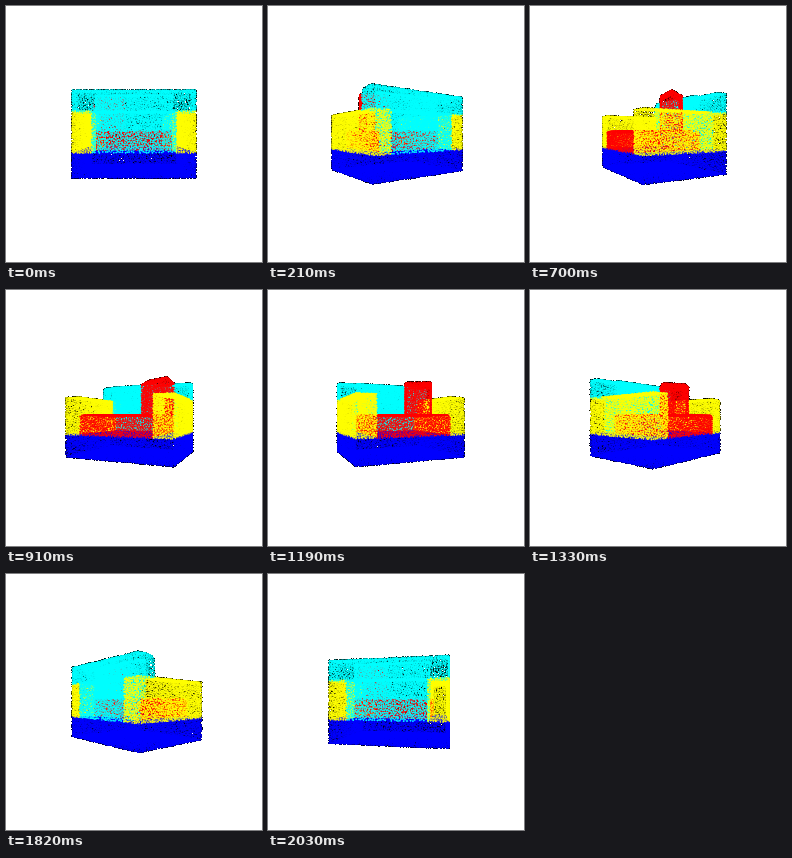
Recreate the animation shown at these times as a matplotlib script. Size 256 px wide and 256 px high, loop 2100 ms.

```python
import numpy as np
import matplotlib.pyplot as plt
from matplotlib.animation import FuncAnimation

SIZE = 256
FRAMES, INTERVAL = 30, 70
FOCAL = SIZE / 2 / np.tan(np.radians(30))   # 60 degree field of view
CAMERA = 6.19
RADIUS = 1.28                               # point radius in pixels
DENSITY = 320                               # points per unit of surface
SURPLUS = 4                                 # candidates per kept point

BLUE, YELLOW = (0, 0, 1), (1, 1, 0)
RED, CYAN = (1, 0, 0), (0, 1, 1)

W, D = 1.41, 1.15                           # half width, half depth
INNER = 0.96                                # inner side of the arms
BASE, SEAT, ARM = -0.43, 0.07, 0.52         # heights of the tops
BACK = 0.68                                 # front of the backrest

rng = np.random.default_rng(7)


def spread(pts):
    """Keep an evenly spaced subset by farthest point sampling."""
    x, y, z = pts.T.copy()
    gap = np.full(len(pts), np.inf)
    keep = np.zeros(len(pts) // SURPLUS, int)
    for i in range(1, len(keep)):
        j = keep[i - 1]
        np.minimum(gap, (x - x[j]) ** 2 + (y - y[j]) ** 2 + (z - z[j]) ** 2,
                   out=gap)
        keep[i] = gap.argmax()
    return pts[keep]


def box(lo, hi, faces="xXyYzZ"):
    """Even points on the chosen faces; capitals mean the upper side."""
    lo, hi = np.array(lo, float), np.array(hi, float)
    size = hi - lo
    parts = []
    for face in faces:
        axis = "xyz".index(face.lower())
        area = np.prod(np.delete(size, axis))
        pts = lo + size * rng.random((int(area * DENSITY * SURPLUS), 3))
        pts[:, axis] = hi[axis] if face.isupper() else lo[axis]
        parts.append(pts)
    return spread(np.vstack(parts))


def round_front(pts, r=0.2):
    """Round the upper front edge of the backrest."""
    dz, dy = BACK + r - pts[:, 2], pts[:, 1] - (1 - r)
    dist = np.hypot(dz, dy)
    out = (dz > 0) & (dy > 0) & (dist > r)
    pts[out, 2] = BACK + r - dz[out] * r / dist[out]
    pts[out, 1] = 1 - r + dy[out] * r / dist[out]
    return pts


def pillow():
    """Turned cushion with a ridge along its top."""
    a, y, b = box((-0.36, SEAT, -0.25), (0.36, 1.04, 0.25)).T
    y = np.minimum(y, 1.04 - 0.15 * np.abs(b) / 0.25)
    c, s = np.cos(np.radians(30)), np.sin(np.radians(30))
    return np.column_stack([-0.69 + a * c - b * s, y, -0.03 + a * s + b * c])


PARTS = [
    (box((-W, -1, -D), (W, BASE, D)), BLUE),
    (box((-W, BASE, -D), (-INNER, ARM, D)), YELLOW),
    (box((INNER, BASE, -D), (W, ARM, D)), YELLOW),
    (box((-INNER, BASE, -D), (INNER, SEAT, BACK)), RED),
    (pillow(), RED),
    (round_front(box((-W, ARM, BACK), (W, 1, D))), CYAN),
    (box((-INNER, BASE, BACK), (INNER, ARM, D), "xXzZ"), CYAN),
    (box((-INNER, SEAT, 0.5), (INNER, 0.97, BACK)), CYAN),
]
POINTS = np.vstack([p for p, _ in PARTS])
COLORS = np.vstack([np.tile(c, (len(p), 1)) for p, c in PARTS]).astype(float)


def render(k):
    """Blend soft discs front to back over black; untouched pixels are white."""
    t = 2 * np.pi * k / FRAMES
    x, y, z = POINTS.T
    depth = CAMERA - (z * np.cos(t) - x * np.sin(t))
    scale = FOCAL / depth
    u = SIZE / 2 + (x * np.cos(t) + z * np.sin(t)) * scale
    v = SIZE / 2 - y * scale

    dy, dx = np.mgrid[-2:3, -2:3].reshape(2, -1, 1)
    col = np.floor(u).astype(int) + dx
    row = np.floor(v).astype(int) + dy
    alpha = 1 - ((col + 0.5 - u) ** 2 + (row + 0.5 - v) ** 2) / RADIUS ** 2
    tap, idx = np.nonzero(alpha > 0)
    pixel = row[tap, idx] * SIZE + col[tap, idx]
    alpha = np.minimum(alpha[tap, idx], 0.999)

    order = np.lexsort((depth[idx], pixel))
    pixel, idx, alpha = pixel[order], idx[order], alpha[order]
    log = np.log(1 - alpha)
    before = np.cumsum(log) - log
    _, start, count = np.unique(pixel, return_index=True, return_counts=True)
    weight = alpha * np.exp(before - np.repeat(before[start], count))

    img = np.column_stack([
        np.bincount(pixel, weight * COLORS[idx, c], SIZE * SIZE)
        for c in range(3)])
    img[np.bincount(pixel, minlength=SIZE * SIZE) == 0] = 1
    return np.clip(img, 0, 1).reshape(SIZE, SIZE, 3)


fig = plt.figure(figsize=(SIZE / 100, SIZE / 100), dpi=100, facecolor="white")
ax = fig.add_axes([0, 0, 1, 1])
ax.axis("off")
view = ax.imshow(render(0), interpolation="nearest", aspect="auto")


def update(k):
    view.set_data(render(k))
    return [view]


anim = FuncAnimation(fig, update, frames=FRAMES, interval=INTERVAL,
                     repeat=True, repeat_delay=0, blit=False)
plt.show()
```
